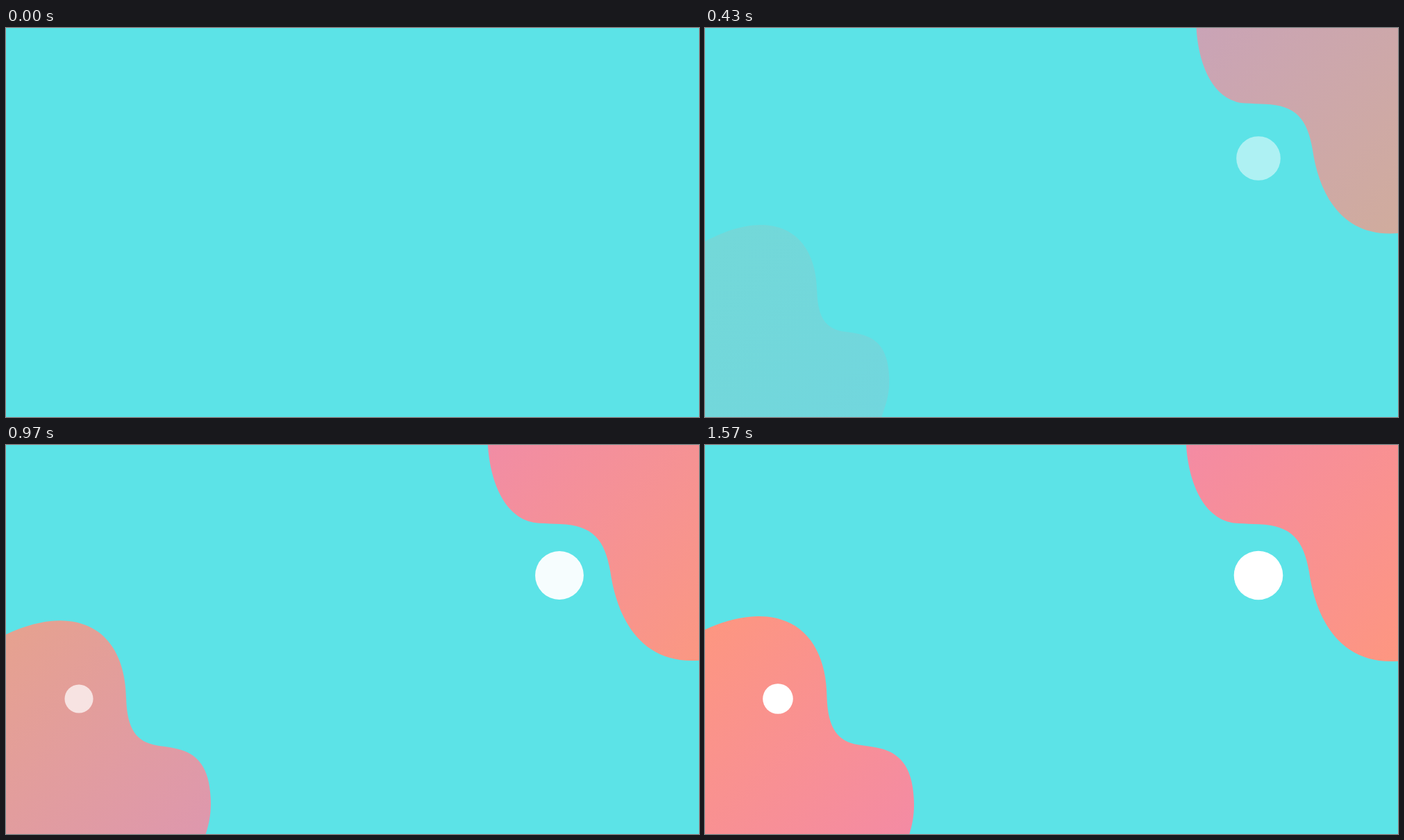
Recreate the animation shown at these times as an HTML page. Size 998 by 561 pixels, loop 6.26 s.

```html
<!DOCTYPE html>
<html lang="en">
<head>
<meta charset="utf-8">
<title>Blobs</title>
<style>
  html, body { margin: 0; width: 100%; height: 100%; overflow: hidden; background: #5ce3e7; }
  svg { display: block; }
</style>
</head>
<body>
<svg width="998" height="561" viewBox="0 0 998 561">
  <defs>
    <linearGradient id="right" gradientUnits="userSpaceOnUse" x1="700" y1="0" x2="999" y2="299">
      <stop offset="0" stop-color="#f48ba3"/><stop offset="1" stop-color="#fd9681"/>
    </linearGradient>
    <linearGradient id="left" gradientUnits="userSpaceOnUse" x1="0" y1="270" x2="290" y2="560">
      <stop offset="0" stop-color="#fd9681"/><stop offset="1" stop-color="#f48ba3"/>
    </linearGradient>
  </defs>
  <path class="part" fill="url(#right)" d="M692.5-10C694 50 717 111 768 113C778 113.5 788 114 797 114.3
    C845 116 862 137 870 183C879 246 910 312 988 312C1010 312 1030 308 1040 303V-10Z"/>
  <circle class="part" cx="797" cy="188" r="35.3" fill="#fff"/>
  <path class="part" fill="url(#left)" d="M-40 289C-10 268 36 247 77 247C143 247 175 296 175.5 364
    C177 407 190 428 222 432.5C258 437.5 301 439 301 520C301 550 290 572 285 590H-40Z"/>
  <circle class="part" cx="105" cy="366" r="21.8" fill="#fff"/>
</svg>
<script>
const LOOP = 6260, FRAME = 100 / 3, GROW = 1400, FIRST = 70, SETTLED = 1570;
const parts = document.querySelectorAll('.part');
// Centre of growth and start time of each part
const moves = [
  { x: 957, y: 33, start: 5 },
  { x: 797, y: 188, start: 178 },
  { x: 93, y: 463, start: 373 },
  { x: 105, y: 366, start: 545 }
];

function progress(t, start) {
  if (t < FIRST) return 0;
  if (t >= SETTLED) return 1;
  const time = Math.floor((t + 4) / FRAME) * FRAME;
  const u = Math.min(1, Math.max(0, (time - start) / GROW));
  return 1 - (1 - u) ** 3.5;
}

function draw(t) {
  moves.forEach(({ x, y, start }, i) => {
    const p = progress(t, start);
    const s = 0.8 + 0.2 * p;
    parts[i].setAttribute('opacity', p);
    parts[i].setAttribute('transform', `translate(${x} ${y}) scale(${s}) translate(${-x} ${-y})`);
  });
}

const begin = performance.now();
function tick() {
  draw((performance.now() - begin) % LOOP);
  requestAnimationFrame(tick);
}
tick();
</script>
</body>
</html>
```
